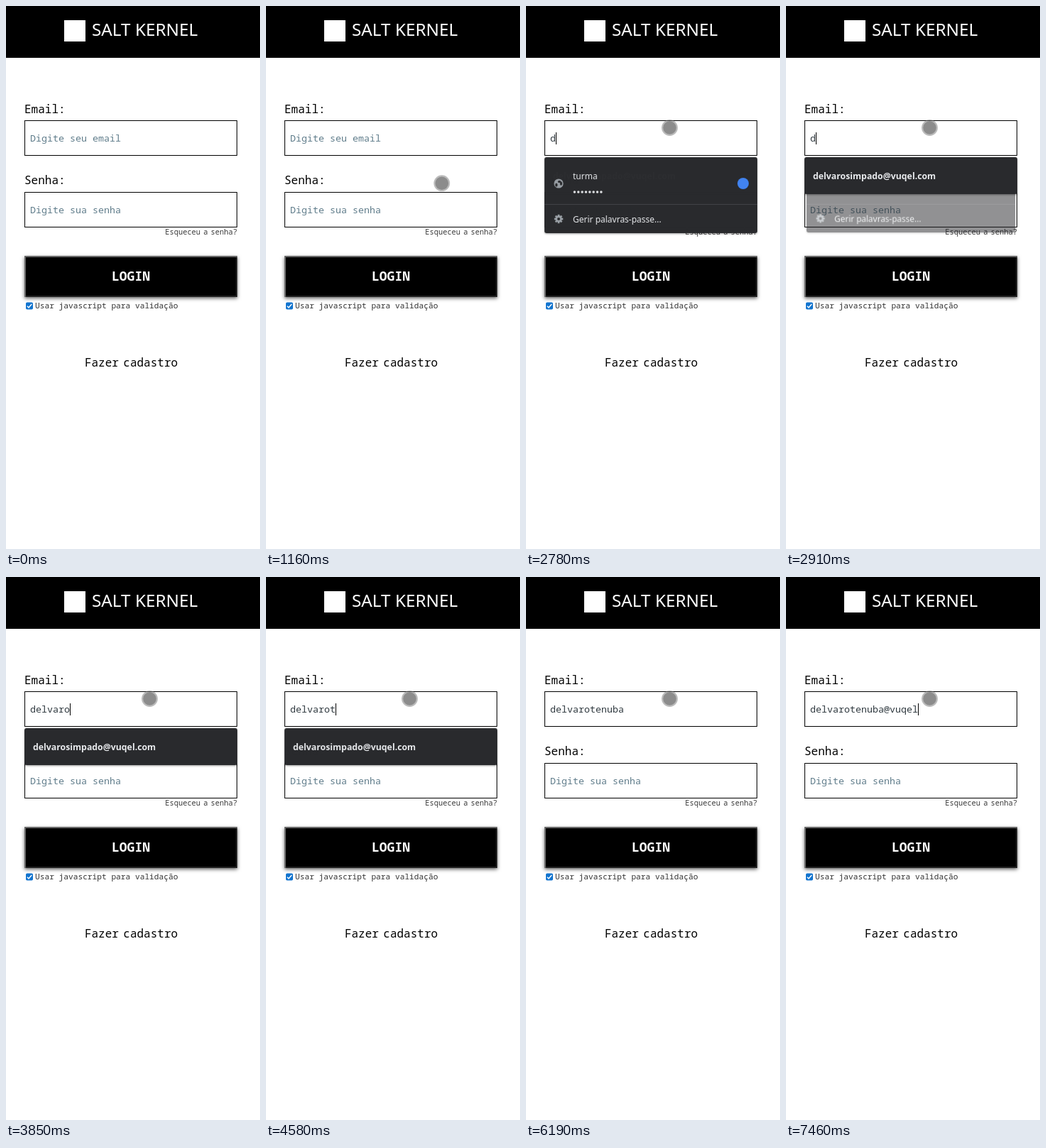
Recreate the animation shown at these times as an HTML page with a canvas. Size 358 px wide and 765 px high, loop 8000 ms.

```html
<!DOCTYPE html>
<html lang="pt">
<head>
<meta charset="utf-8">
<title>Login</title>
<style>
  html, body { margin: 0; width: 100%; height: 100%; overflow: hidden; background: #fff; }
  canvas { display: block; width: 358px; height: 765px; }
</style>
</head>
<body>
<canvas id="stage"></canvas>
<script>
const W = 358, H = 765, LOOP = 8000;
const MONO = '"Noto Sans Mono", "DejaVu Sans Mono", monospace';
const SANS = '"Noto Sans", "Open Sans", sans-serif';
const FIELD_FONT = `13.333px ${MONO}`;
const LIGHT = '#e8eaed', MUTED = '#9aa0a6', PANEL = '#292a2d', HINT = '#607d8b';

const TYPED = 'delvarotenuba@vuqel';
const FOCUS = 1790, BLINK = 530;
// Bursts of typing: start, keys, gap between keys
const BURSTS = [[2780, 1, 0], [3110, 6, 148], [4580, 2, 160], [5070, 4, 130], [6650, 2, 400], [7250, 4, 70]];
const KEYS = BURSTS.flatMap(([start, n, gap]) => Array.from({ length: n }, (_, i) => start + i * gap));

const dpr = window.devicePixelRatio || 1;

function context(canvas) {
  canvas.width = W * dpr;
  canvas.height = H * dpr;
  const c = canvas.getContext('2d');
  c.scale(dpr, dpr);
  return c;
}

const screen2d = context(document.getElementById('stage'));
const layer2d = context(document.createElement('canvas'));
let ctx = screen2d;

const ramp = (t, from, to) => Math.min(1, Math.max(0, (t - from) / (to - from)));
const lerp = (a, b, p) => a + (b - a) * p;
const smooth = p => p * p * (3 - 2 * p);
const easeOut = p => 1 - (1 - p) ** 2;

function text(str, x, y, font, color, align = 'left', wordGap = 0) {
  ctx.font = font;
  ctx.fillStyle = color;
  ctx.textAlign = align;
  ctx.wordSpacing = wordGap + 'px';
  ctx.fillText(str, x, y);
}

function rect(x, y, w, h, color, r = 0) {
  ctx.fillStyle = color;
  ctx.beginPath();
  ctx.roundRect(x, y, w, h, r);
  ctx.fill();
}

function oval(x, y, rx, ry, color) {
  ctx.fillStyle = color;
  ctx.beginPath();
  ctx.ellipse(x, y, rx, ry, 0, 0, Math.PI * 2);
  ctx.fill();
}

const disc = (x, y, r, color) => oval(x, y, r, r, color);

function line(color, width, ...points) {
  ctx.strokeStyle = color;
  ctx.lineWidth = width;
  ctx.beginPath();
  points.forEach(([x, y]) => ctx.lineTo(x, y));
  ctx.stroke();
}

function shadowRect(x, y, w, h, color, r, shade, blur, dy) {
  ctx.save();
  ctx.shadowColor = shade;
  ctx.shadowBlur = blur * dpr;
  ctx.shadowOffsetY = dy * dpr;
  rect(x, y, w, h, color, r);
  ctx.restore();
}

function header() {
  rect(0, 0, W, 73, '#000');
  rect(82, 20, 30, 30, '#fff');
  text('SALT KERNEL', 121, 42, `24.3px ${SANS}`, '#fff');
}

function field(y) {
  ctx.strokeStyle = '#000';
  ctx.lineWidth = 1;
  ctx.strokeRect(26.5, y + 0.5, 299, 49);
}

function button() {
  shadowRect(26, 352, 300, 58, '#222', 0, 'rgba(0,0,0,.6)', 5, 2);
  line('#666', 2, [27, 410], [27, 353], [326, 353]);
  rect(28, 354, 296, 54, '#000');
  text('LOGIN', 176, 387, `600 18px ${MONO}`, '#fff', 'center');
}

function checkbox() {
  rect(28, 417.5, 10, 10, '#1274cf', 1.8);
  line('#fff', 1.5, [29.9, 422.7], [32, 424.9], [36.2, 419.9]);
  text('Usar javascript para validação', 41, 426, `11.2px ${MONO}`, '#333');
}

function emailInput(t) {
  field(161);
  const pressed = KEYS.filter(k => k <= t);
  const value = TYPED.slice(0, pressed.length);
  text(value || 'Digite seu email', 34, 191, FIELD_FONT, value ? '#303a40' : HINT);

  const idle = t - (pressed.at(-1) ?? FOCUS);
  if (idle >= 0 && idle % (2 * BLINK) < BLINK) {
    rect(34 + Math.round(ctx.measureText(value).width), 178, 1, 17, '#000');
  }
}

function form(t) {
  const label = `16px ${MONO}`;
  text('Email:', 26, 151, label, '#000');
  emailInput(t);
  text('Senha:', 26, 251, label, '#000');
  field(262);
  text('Digite sua senha', 34, 292, FIELD_FONT, HINT);
  text('Esqueceu a senha?', 326, 322, `10.4px ${MONO}`, '#3a3a3a', 'right', -2.1);
  button();
  checkbox();
  text('Fazer cadastro', 176.5, 508, label, '#000', 'center', -3.2);
}

function globe(x, y) {
  disc(x, y, 6.6, MUTED);
  oval(x - 3.2, y + 2, 1.7, 2.6, PANEL);
  oval(x + 1, y - 2.6, 2.2, 1.6, PANEL);
  oval(x + 3.4, y, 1.6, 2.8, PANEL);
}

function gear(x, y) {
  const teeth = 8;
  ctx.save();
  ctx.translate(x, y);
  disc(0, 0, 4.7, MUTED);
  for (let i = 0; i < teeth; i++) {
    rect(-1.3, -6.2, 2.6, 3, MUTED);
    ctx.rotate(Math.PI * 2 / teeth);
  }
  disc(0, 0, 2, PANEL);
  ctx.restore();
}

function accounts() {
  const font = `12px ${SANS}`;
  globe(46, 250);
  text('turma', 66, 244, font, LIGHT);
  for (let i = 0; i < 8; i++) disc(68.4 + i * 5.35, 262, 1.75, LIGHT);
  disc(306, 250, 8, '#4285f4');
  rect(26, 279, 300, 1, '#414347');
  gear(46, 300);
  text('Gerir palavras-passe...', 66, 304.5, font, LIGHT);
}

function suggestion() {
  text('delvarosimpado@vuqel.com', 38, 244, `600 12.3px ${SANS}`, LIGHT);
}

// Painted on its own layer so that the whole panel fades as one
function menu(height, shown, gone, content) {
  const alpha = shown * (1 - gone);
  if (!alpha) return;
  ctx = layer2d;
  ctx.clearRect(0, 0, W, H);
  shadowRect(26, 213, 300, height, PANEL, 3, 'rgba(0,0,0,.4)', 3, 1);
  content();
  ctx = screen2d;

  const cx = 176, cy = 213 + height / 2, scale = 1 - 0.04 * gone;
  ctx.save();
  ctx.globalAlpha = alpha;
  ctx.translate(cx, cy);
  ctx.scale(scale, scale);
  ctx.drawImage(layer2d.canvas, -cx, -cy, W, H);
  ctx.restore();
}

function pointer(t) {
  const start = 810, step = 70;
  if (t < start) return;
  const tick = start + Math.floor((t - start) / step) * step;
  const p = ramp(tick, start, 1370), nudge = ramp(t, 1920, 2060);
  const x = lerp(336.5, 198.5, smooth(p ** 1.1)) + 4 * nudge;
  const y = lerp(721.5, 172.5, easeOut(p)) - nudge;
  disc(x, y, 11.4, 'rgba(119,119,119,.5)');
  disc(x, y, 9.3, 'rgba(119,119,119,.7)');
}

function draw() {
  const t = performance.now() % LOOP;
  rect(0, 0, W, H, '#fff');
  header();
  form(t);
  menu(107, ramp(t, 1700, 1860), ramp(t, 2780, 3050), accounts);
  menu(52, ramp(t, 2780, 2850), ramp(t, 4580, 4810), suggestion);
  pointer(t);
  requestAnimationFrame(draw);
}
draw();
</script>
</body>
</html>
```
